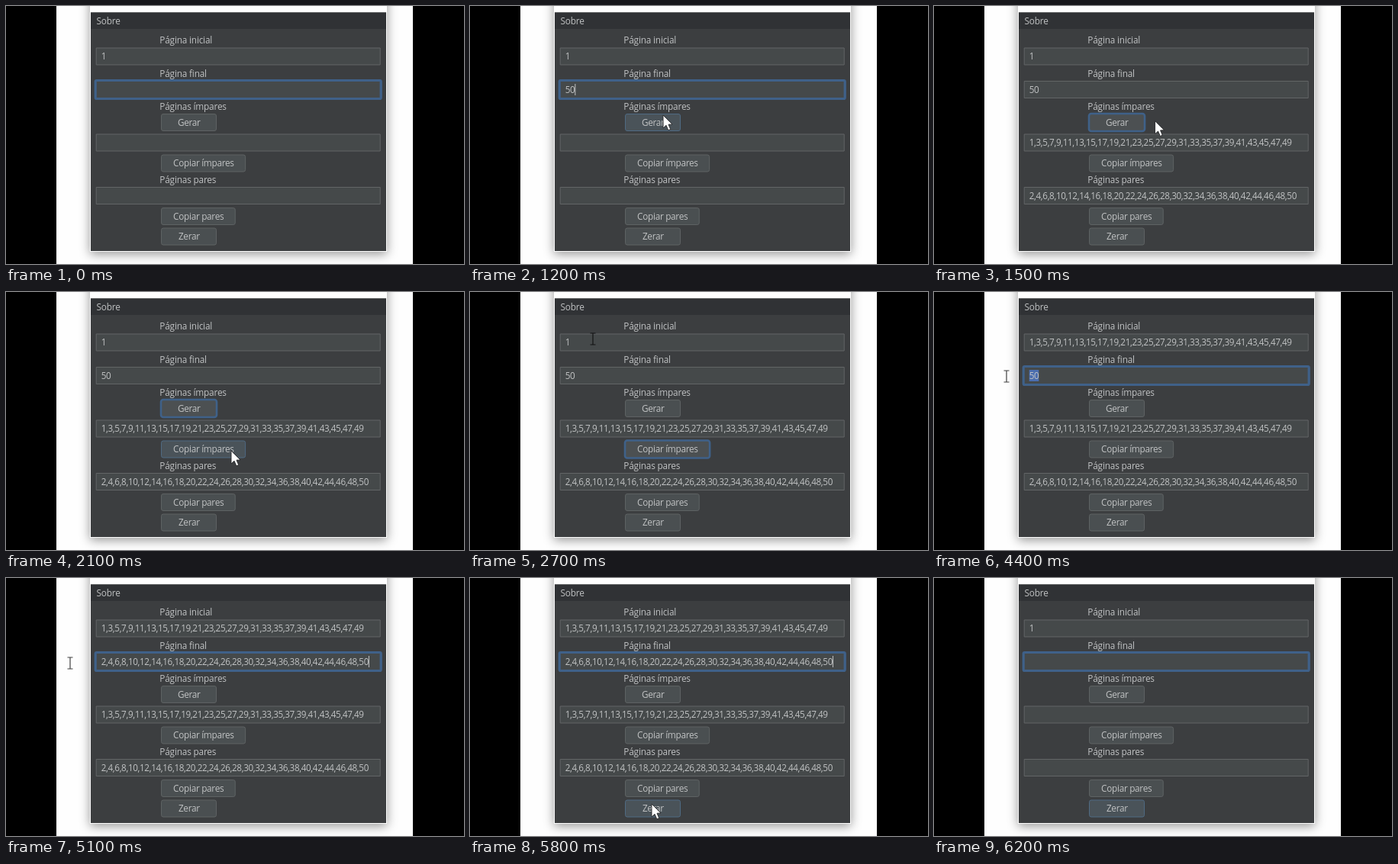
An HTML page with a canvas for the animation above (6300 ms loop, 600x338 px).

```html
<!DOCTYPE html>
<html lang="pt">
<head>
<meta charset="utf-8">
<style>
html, body { margin: 0; width: 100%; height: 100%; overflow: hidden; background: #000; }
canvas { display: block; }
</style>
</head>
<body>
<canvas id="stage" width="600" height="338"></canvas>
<script>
const ctx = document.getElementById('stage').getContext('2d');
const LOOP = 6300, STEP = 100;
const FONT = '"Open Sans", "Noto Sans", sans-serif';
const INK = '#c0c2c3', BLUE = '#3f6189';

const series = first => Array.from({ length: 25 }, (_, i) => first + 2 * i).join(',');
const odd = series(1), even = series(2);

// Vertical centres; everything else hangs off the fields.
const fields = [66, 109.5, 179, 248.5];
const LABEL_GAP = 21, COPY_GAP = 27, HEIGHT = 22;
const makeY = fields[2] - 26.5;
const labels = [
  ['Página inicial', fields[0] - LABEL_GAP],
  ['Página final', fields[1] - LABEL_GAP],
  ['Páginas ímpares', makeY - LABEL_GAP],
  ['Páginas pares', fields[3] - LABEL_GAP]
];
const buttons = [
  ['Gerar', makeY],
  ['Copiar ímpares', fields[2] + COPY_GAP],
  ['Copiar pares', fields[3] + COPY_GAP],
  ['Zerar', fields[3] + 2 * COPY_GAP - 0.5]
].map(([text, y]) => ({ text, y }));

const focus = (s, target) => { s.focus = target; s.marked = false; };
const mark = (s, i) => { s.focus = i; s.marked = true; };
const enter = (s, i, text) => { s.values[i] = text; s.marked = false; };
const generate = s => { focus(s, 'Gerar'); s.values.splice(2, 2, odd, even); };
const reset = s => { s.values = ['1', '', '', '']; };

const events = [
  [300, enter, 1, '5'],
  [500, enter, 1, '50'],
  [1400, generate],
  [2300, focus, 'Copiar ímpares'],
  [2800, mark, 0],
  [3300, enter, 0, odd],
  [4100, focus, 'Copiar pares'],
  [4400, mark, 1],
  [4800, enter, 1, even],
  [5900, reset]
];

// Pointer stops: arrival time, x, y
const stops = [
  [0, 499, 86], [700, 499, 86], [800, 440, 26], [1200, 253, 143], [1400, 255, 146],
  [1800, 476, 176], [2100, 295, 208], [2300, 295, 208], [2700, 161, 62],
  [2850, 95, 66], [3100, 259, 70], [3600, 270, 78], [3800, 341, 261],
  [4100, 261, 273], [4400, 95, 111], [5100, 84, 112], [5700, 238, 296], [LOOP, 238, 296]
];

function stateAt(t) {
  const s = { values: ['1', '', '', ''], focus: 1, marked: false };
  for (const [time, act, ...args] of events) if (time <= t) act(s, ...args);
  return s;
}

function pointerAt(t) {
  const i = stops.findIndex(p => p[0] > t);
  const [t0, x0, y0] = stops[i - 1], [t1, x1, y1] = stops[i];
  const k = (t - t0) / (t1 - t0), ease = k * k * (3 - 2 * k);
  const x = x0 + (x1 - x0) * ease, y = y0 + (y1 - y0) * ease;
  const overField = fields.some(f => Math.abs(y - f) < 15) && x < 491;
  return { x, y, beam: overField || x < 110, shown: t >= 600 && t < 6200 };
}

function box(x, y, w, h, r, fill, stroke, line = 1) {
  ctx.beginPath();
  ctx.roundRect(x, y, w, h, r);
  ctx.fillStyle = fill;
  ctx.fill();
  ctx.strokeStyle = stroke;
  ctx.lineWidth = line;
  ctx.stroke();
}

function setType(size, gap, align = 'left') {
  ctx.font = `${size}px ${FONT}`;
  ctx.letterSpacing = gap + 'px';
  ctx.textAlign = align;
}

function write(text, x, mid) {
  ctx.fillStyle = INK;
  ctx.fillText(text, x, mid + 4.2);
}

function drawWindow() {
  ctx.fillStyle = '#000';
  ctx.fillRect(0, 0, 600, 338);
  ctx.fillStyle = '#fefefe';
  ctx.fillRect(66, 0, 467, 338);
  ctx.save();
  ctx.shadowColor = 'rgba(0,0,0,.42)';
  ctx.shadowBlur = 13;
  ctx.shadowOffsetY = 3;
  ctx.fillRect(110, -40, 389, 362);
  ctx.restore();
  ctx.fillStyle = '#3c3e40';
  ctx.fillRect(111, 8.5, 387, 312.5);
  ctx.fillStyle = '#303235';
  ctx.fillRect(111, 8.5, 387, 21.5);
  setType(11.8, -0.18);
  write('Sobre', 118.5, 20);
  for (const [text, y] of labels) write(text, 201.3, y);
}

function drawField(mid, value, focused, caret, marked) {
  const top = mid - HEIGHT / 2;
  if (focused) box(117.2, top - 1, 374, HEIGHT + 2, 1.5, '#45494a', BLUE, 3.2);
  else box(118.2, top, 372, HEIGHT, 0, '#45494a', '#626566');
  setType(11.7, -0.37);
  const left = 124.7, width = ctx.measureText(value).width;
  if (focused && marked) {
    ctx.fillStyle = '#4b6eaf';
    ctx.fillRect(left, mid - 7.5, width, 15);
  }
  write(value, left, mid);
  if (focused && caret && value && !marked) ctx.fillRect(left + width, mid - 7.5, 1, 15);
}

function drawButton({ text, y }, focused, p) {
  setType(11.8, -0.3, 'center');
  const left = 203.5, top = y - HEIGHT / 2;
  const w = Math.max(72, ctx.measureText(text).width + 30.5);
  const hover = !p.beam && p.x > left && p.x < left + w && Math.abs(p.y - y) < HEIGHT / 2;
  if (focused) box(left - 0.5, top - 0.5, w + 1, HEIGHT + 1, 3, '#4c5052', BLUE, 2.6);
  else box(left, top, w, HEIGHT, 2.5, hover ? '#4a5359' : '#4a4f51', hover ? '#4f6a83' : '#5e6263');
  write(text, left + w / 2 + 0.3, y);
}

function drawPointer({ x, y, beam }) {
  ctx.save();
  ctx.translate(x, y);
  ctx.beginPath();
  if (beam) {
    for (const end of [-8, 7]) {
      ctx.moveTo(-3.5, end);
      ctx.lineTo(3.5, end);
    }
    ctx.moveTo(0, -8);
    ctx.lineTo(0, 7);
    ctx.strokeStyle = 'rgba(0,0,0,.75)';
    ctx.lineWidth = 1.2;
  } else {
    [[0, 0], [0, 17], [4, 13.3], [6.8, 19.8], [9.7, 18.5], [7, 12.2], [12, 12]]
      .forEach(q => ctx.lineTo(...q));
    ctx.closePath();
    ctx.fillStyle = '#fff';
    ctx.fill();
    ctx.strokeStyle = '#26282a';
    ctx.lineWidth = 0.9;
  }
  ctx.stroke();
  ctx.restore();
}

function render(now) {
  const t = Math.floor((now % LOOP) / STEP) * STEP;
  const s = stateAt(t), p = pointerAt(t);
  const caret = (t + 400) % 1000 < 700;
  drawWindow();
  fields.forEach((mid, i) => drawField(mid, s.values[i], s.focus === i, caret, s.marked));
  buttons.forEach(b => drawButton(b, s.focus === b.text, p));
  if (p.shown) drawPointer(p);
}

const start = performance.now();
function tick() {
  render(performance.now() - start);
  requestAnimationFrame(tick);
}
tick();
</script>
</body>
</html>
```
